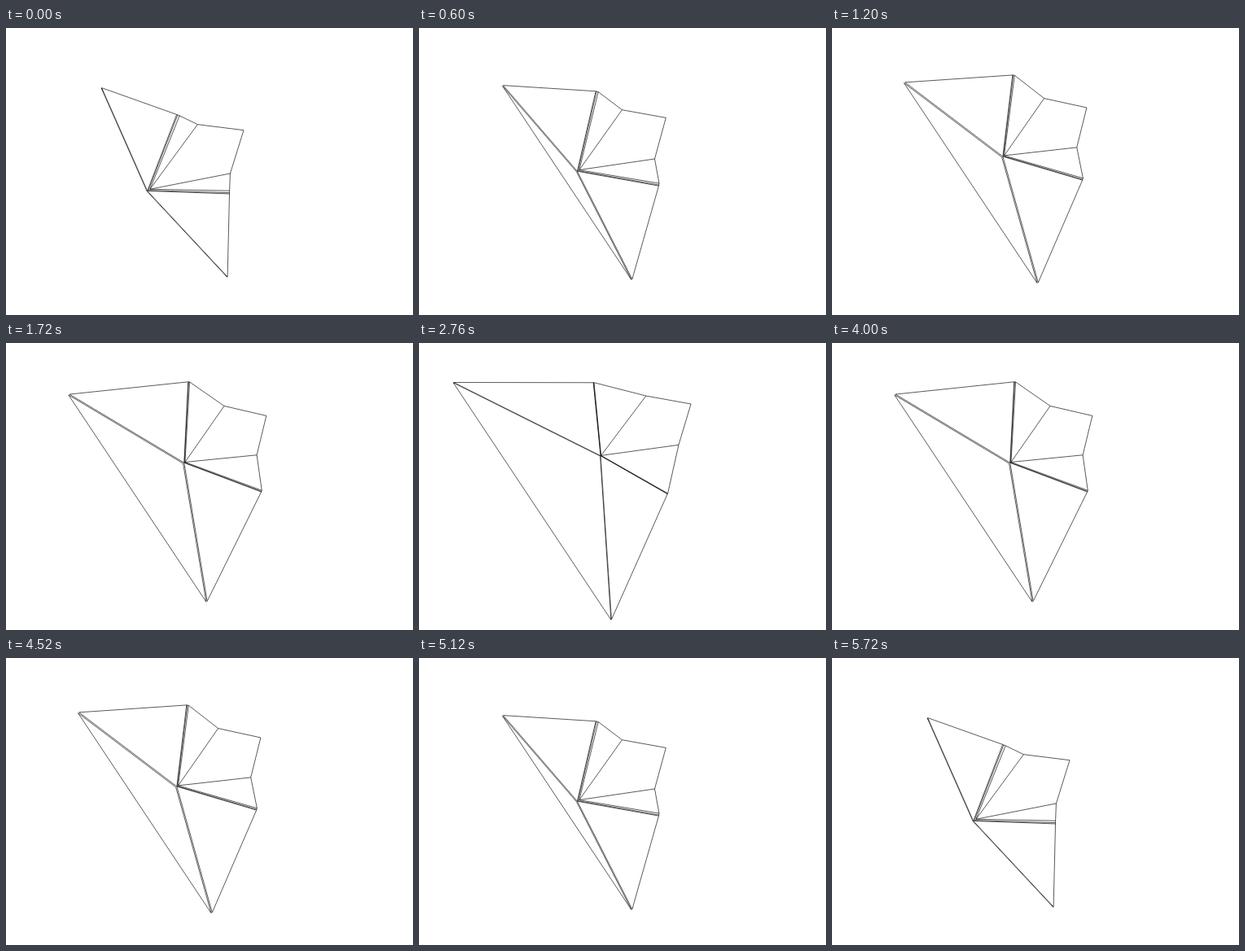
An HTML page that plays this animation: 500x353 px, repeating every 5760 ms.

```html
<!DOCTYPE html>
<html lang="en">
<head>
<meta charset="utf-8">
<title>Folding sheet</title>
<style>
  html, body { margin: 0; width: 100%; height: 100%; overflow: hidden; background: #fff; }
  svg { display: block; width: 100vw; height: 100vh; }
  path { stroke: #000; stroke-width: .65; stroke-linejoin: round; fill: none; }
  .panel { fill: #fff; }
</style>
</head>
<body>
<svg viewBox="0 0 500 353"></svg>
<script>
const STEP = 40, STEPS = 144, LAST = STEPS / 2 - 1;

// The sheet is mirror-symmetric: paired vertices lie either side of a midpoint along AXIS.
const AXIS = [.5535, .8328];
const ACROSS = [AXIS[1], -AXIS[0]];
const CORNER_HALF = 36.2, CORNER_RATIO = .682;

// Each part follows a quadratic curve (x, y, half width) and a final snap as the sheet flattens.
const wing = { from: [194.6, 190, 139.6], bend: [164, 190, 146.5], to: [145.5, 192, 166.6], snap: [-7.6, 2.7, 10] };
const shoulder = { from: [243, 154.6, 57], bend: [281.2, 102.3, 89.2], to: [264.9, 114.9, 79.6], snap: [-6, 2.9, 2] };
const tip = { from: [292, 125.7], bend: [320.9, 86.2], to: [330.2, 78.4], snap: [4.6, -4] };
const centre = { from: [173.4, 200.6], bend: [228.4, 136.4], to: [223.9, 140], snap: [-1.3, -1] };

const svg = document.querySelector("svg");
const move = ([x, y], [dx, dy], distance) => [x + dx * distance, y + dy * distance];
const mix = (a, b, t) => a.map((v, i) => v + (b[i] - v) * t);
const pair = (middle, half) => [move(middle, AXIS, -half), move(middle, AXIS, half)];

function smoothstep(start, end, x) {
  const t = Math.min(Math.max((x - start) / (end - start), 0), 1);
  return t * t * (3 - 2 * t);
}

function place({ from, bend, to, snap }, t) {
  const curve = mix(mix(from, bend, t), mix(bend, to, t), t);
  const pull = smoothstep(.77, 1, t);
  return curve.map((v, i) => v + snap[i] * pull);
}

function shape(points, closed) {
  const d = "M" + points.map(p => p.map(v => v.toFixed(2)).join(" ")).join("L");
  return closed ? `<path class="panel" d="${d}Z"/>` : `<path d="${d}"/>`;
}

function draw(t) {
  const [wx, wy, wingHalf] = place(wing, t);
  const [sx, sy, shoulderHalf] = place(shoulder, t);
  const corner = place(tip, t), hinge = place(centre, t);

  const hingeGap = 3.8 - 3.1 * t;
  const layerGap = .6 + .9 * Math.sin(Math.PI * t);
  const hub = move(hinge, ACROSS, hingeGap * 1.1);
  const lift = p => move(p, ACROSS, layerGap / 2);
  const drop = p => move(p, ACROSS, -layerGap / 2);

  const wings = pair([wx, wy], wingHalf);
  const inner = pair(mix(hub, corner, CORNER_RATIO), CORNER_HALF);
  const shoulders = pair([sx, sy], shoulderHalf);

  // Hinge strips run from the centre to each shoulder as three lines.
  const strips = shoulders.map((end, side) => {
    const dx = end[0] - hinge[0], dy = end[1] - hinge[1];
    const k = (side ? 1 : -1) / Math.hypot(dx, dy);
    const normal = [dy * k, -dx * k];
    const low = move(end, normal, -hingeGap / 2), high = move(end, normal, hingeGap / 2);
    return { low, high, middle: mix(low, high, .35) };
  });
  const [upper, lower] = strips;
  const top = lift(hinge);

  svg.innerHTML =
    shape([wings[0], hinge, wings[1]].map(drop), true) +
    shape([lift(wings[0]), upper.low, upper.high, inner[0], corner, inner[1],
      lower.high, lower.low, lift(wings[1]), top], true) +
    strips.map(s => shape([top, s.low]) + shape([mix(top, hub, .35), s.middle]) + shape([hub, s.high])).join("") +
    shape([inner[0], hub, inner[1]]);
}

function tick() {
  const n = Math.floor(performance.now() / STEP) % STEPS;
  draw(Math.min(n, STEPS - 1 - n) / LAST);
  requestAnimationFrame(tick);
}
tick();
</script>
</body>
</html>
```
